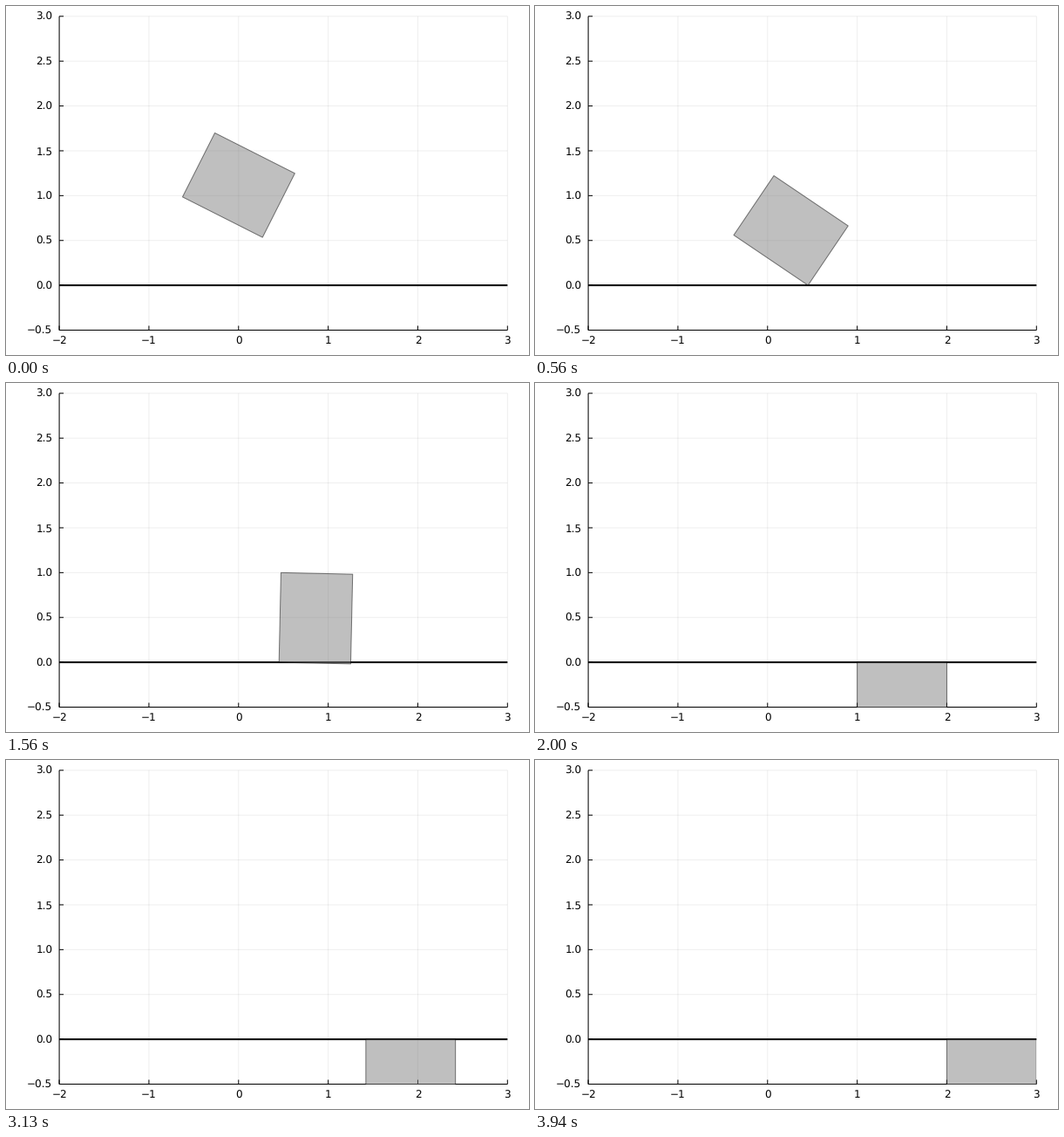
A matplotlib script for the animation above (4000 ms loop, 600 by 400 pixels).

```python
import numpy as np
import matplotlib.pyplot as plt
from matplotlib.animation import FuncAnimation
from matplotlib.collections import LineCollection
from matplotlib.patches import Polygon

W, H, DPI = 600, 400, 100
LOOP_MS, TICK_MS, STEP_MS = 4000, 10, 62.5
LEFT, RIGHT, TOP, BOTTOM = 61.1, 575.3, 11.8, 371.5
PX = 72 / DPI  # one pixel in points

# Key steps of the motion
IMPACT, ROCK, TIP, FLAT, SLIDE = 7, 8, 25, 32, 37
BOX_W, BOX_H = 0.8, 1.0
PIVOT = 0.4515
START_CENTER, START_ANGLE = np.array([0.0015, 1.117]), 63.2
ROCK_ANGLE = 56.5
SPEED, RAMP = 0.0446, 7.16
TIP_STEPS = [23, 24, 25, 26, 27, 28, 29, 30, 31, 32]
TIP_ANGLES = [0, 0.2, 1.25, 9, 23.1, 37, 51, 65, 78, 90]

CORNERS = np.array([[0, 0], [BOX_W, 0], [BOX_W, BOX_H], [0, BOX_H]])
CENTER = np.array([BOX_W / 2, BOX_H / 2])

plt.rcParams["text.hinting"] = "none"


def rotate(points, degrees):
    a = np.radians(degrees)
    c, s = np.cos(a), np.sin(a)
    return points @ np.array([[c, s], [-s, c]])


def pose(k):
    """Position of the pivot corner and the turn of the box at step k."""
    if k < IMPACT:
        u = k / IMPACT
        angle = START_ANGLE + (ROCK_ANGLE - START_ANGLE) * u
        end = np.array([PIVOT, 0]) + rotate(CENTER, ROCK_ANGLE)
        center = START_CENTER + (end - START_CENTER) * np.array([u, u * u])
        return center - rotate(CENTER, angle), angle
    if k <= 20:
        angle = max(0, ROCK_ANGLE - 0.535 * max(0, k - ROCK) ** 1.892)
        return np.array([PIVOT, 0]), angle
    if k <= FLAT:
        u = max(0, k - TIP) / (FLAT - TIP)
        x = PIVOT + (1 - PIVOT) * u * u
        return np.array([x, 0]), -np.interp(k, TIP_STEPS, TIP_ANGLES)
    s = max(0, k - SLIDE)
    x = 1 + SPEED * (min(s, RAMP) ** 2 / (2 * RAMP) + max(0, s - RAMP))
    return np.array([x, 0]), -90


def box_points(k):
    corner, angle = pose(k)
    return corner + rotate(CORNERS, angle)


def step_at(ms):
    """Each step starts at its time rounded to whole ticks."""
    return int((ms + 0.49 * TICK_MS) // STEP_MS)


fig = plt.figure(figsize=(W / DPI, H / DPI), dpi=DPI, facecolor="white")
ax = fig.add_axes([LEFT / W, 1 - BOTTOM / H,
                   (RIGHT - LEFT) / W, (BOTTOM - TOP) / H])
ax.set_xlim(-2, 3)
ax.set_ylim(-0.5, 3)
ax.axis("off")

sx = (RIGHT - LEFT) / 5
sy = (BOTTOM - TOP) / 3.5
tick = 5


def lines(segments, width=1, alpha=1, zorder=2):
    # Unsnapped lines keep their place between pixels
    group = LineCollection(segments, linewidths=width * PX, colors="black",
                           alpha=alpha, zorder=zorder, clip_on=False)
    group.set_snap(False)
    ax.add_collection(group, autolim=False)


def label(text, x, y, ha):
    fig.text(x / W, 1 - y / H, text.replace("-", "\u2212"), ha=ha,
             va="baseline", fontsize=12 * PX, family="DejaVu Sans",
             color="black")


xticks = range(-2, 4)
yticks = np.arange(-0.5, 3.1, 0.5)
lines([[(x, -0.5), (x, 3)] for x in xticks]
      + [[(-2, y), (3, y)] for y in yticks], alpha=0.065, zorder=1)
lines([[(x, -0.5), (x, -0.5 + tick / sy)] for x in xticks]
      + [[(-2, y), (-2 + tick / sx, y)] for y in yticks])
lines([[(-2, -0.5), (3, -0.5)], [(-2, -0.5), (-2, 3)]])
lines([[(-2, 0), (3, 0)]], width=2, zorder=3)

for x in xticks:
    label(f"{x}", LEFT + (x + 2) * sx, 387.4, "center")
for y in yticks:
    label(f"{y:.1f}", 53.3, TOP + (3 - y) * sy + 4.4, "right")

box = Polygon(box_points(0), closed=True, facecolor=(0.5, 0.5, 0.5, 0.5),
              edgecolor=(0, 0, 0, 0.5), lw=PX, joinstyle="round", zorder=4)
box.set_snap(False)
ax.add_patch(box)


def update(i):
    box.set_xy(box_points(step_at(i * TICK_MS)))
    return (box,)


anim = FuncAnimation(fig, update, frames=LOOP_MS // TICK_MS, interval=TICK_MS,
                     init_func=lambda: update(0), repeat=True, blit=False)
plt.show()
```
